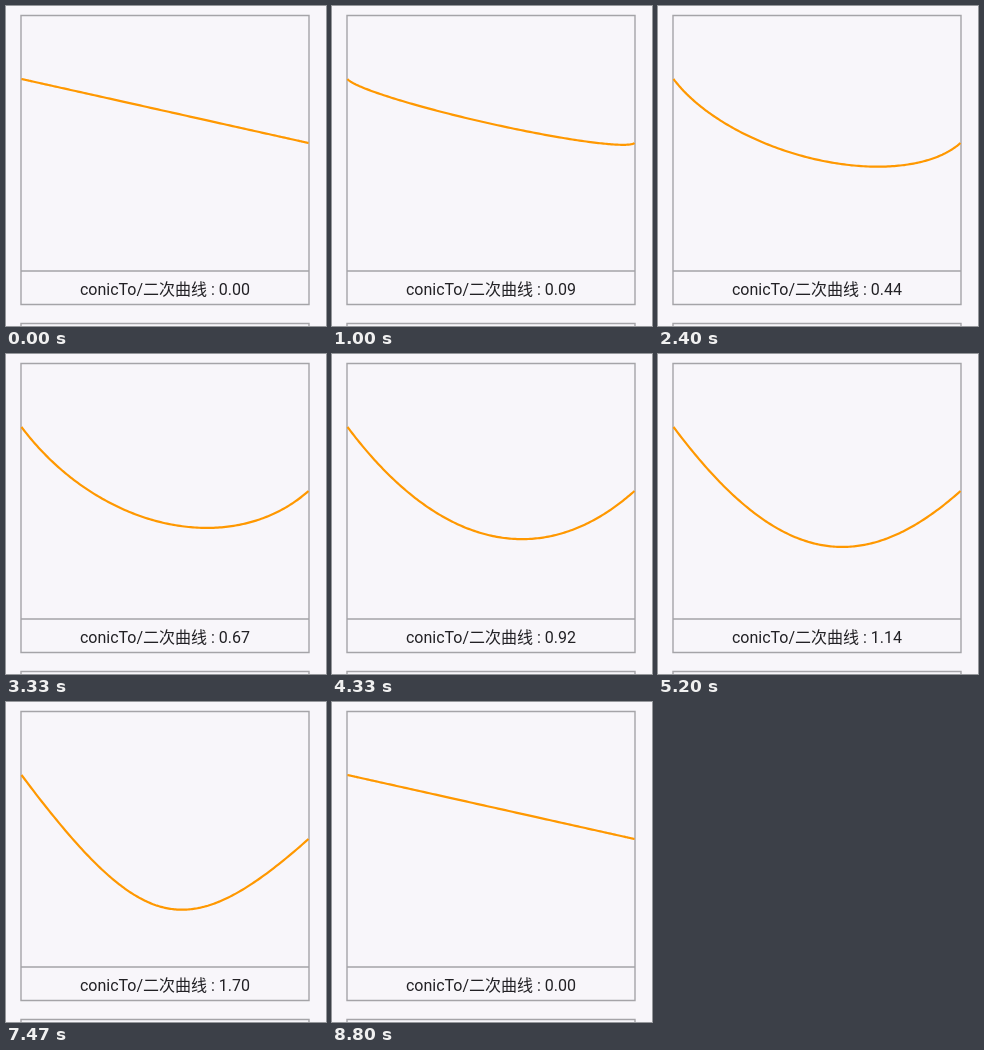
An HTML page for the animation above (9.59 s loop, 320 px wide and 320 px high).

```html
<!DOCTYPE html>
<html lang="zh-CN">
<head>
<meta charset="utf-8">
<title>conicTo</title>
<style>
  html, body { margin: 0; width: 100%; height: 100%; overflow: hidden; background: #f8f6fa; }
  svg { display: block; width: 100%; height: 100%; }
  .frame { fill: none; stroke: #a5a4a8; stroke-width: 1.4; }
  #curve { fill: none; stroke: #ff9800; stroke-width: 2.2; stroke-linejoin: round; }
  text { font: 16px Roboto, "Noto Sans CJK SC", "Noto Sans CJK", sans-serif; fill: #222125; white-space: pre; }
</style>
</head>
<body>
<svg viewBox="0 0 320 320">
  <path class="frame" d="M15 9.5H303V298.5H15ZM15 265H303M15 330V317.5H303V330"/>
  <polyline id="curve"/>
  <text id="label" x="159" y="288.8" text-anchor="middle"></text>
</svg>
<script>
const LOOP = 9590, FPS = 15, START = 653, RATE = 1 / 4000, RESET = 8730;
const A = [15.5, 73], C = [159, 265], B = [302.5, 137], SEGMENTS = 160;
const curve = document.getElementById('curve');
const label = document.getElementById('label');

// Point on the rational quadratic A-C-B with weight w
function conic(u, w) {
  const a = (1 - u) ** 2, c = 2 * w * u * (1 - u), b = u * u;
  return [0, 1].map(i => ((a * A[i] + c * C[i] + b * B[i]) / (a + b + c)).toFixed(2));
}

// Weight rises steadily in 15 fps steps, then snaps back to zero
function weightAt(t) {
  const tick = Math.floor(t / 10) * 10;
  if (tick >= RESET) return 0;
  const step = Math.floor((tick + 3.4) * FPS / 1000);
  return Math.min(2, Math.max(0, (step * 1000 / FPS - START) * RATE));
}

function draw(w) {
  const points = Array.from({ length: SEGMENTS + 1 }, (_, i) => conic(i / SEGMENTS, w));
  curve.setAttribute('points', points.join(' '));
  label.textContent = `conicTo/二次曲线 : ${w.toFixed(2)}`;
}

let shown;
const begin = performance.now();
function tick() {
  const w = weightAt((performance.now() - begin) % LOOP);
  if (w !== shown) draw(shown = w);
  requestAnimationFrame(tick);
}
tick();
</script>
</body>
</html>
```
